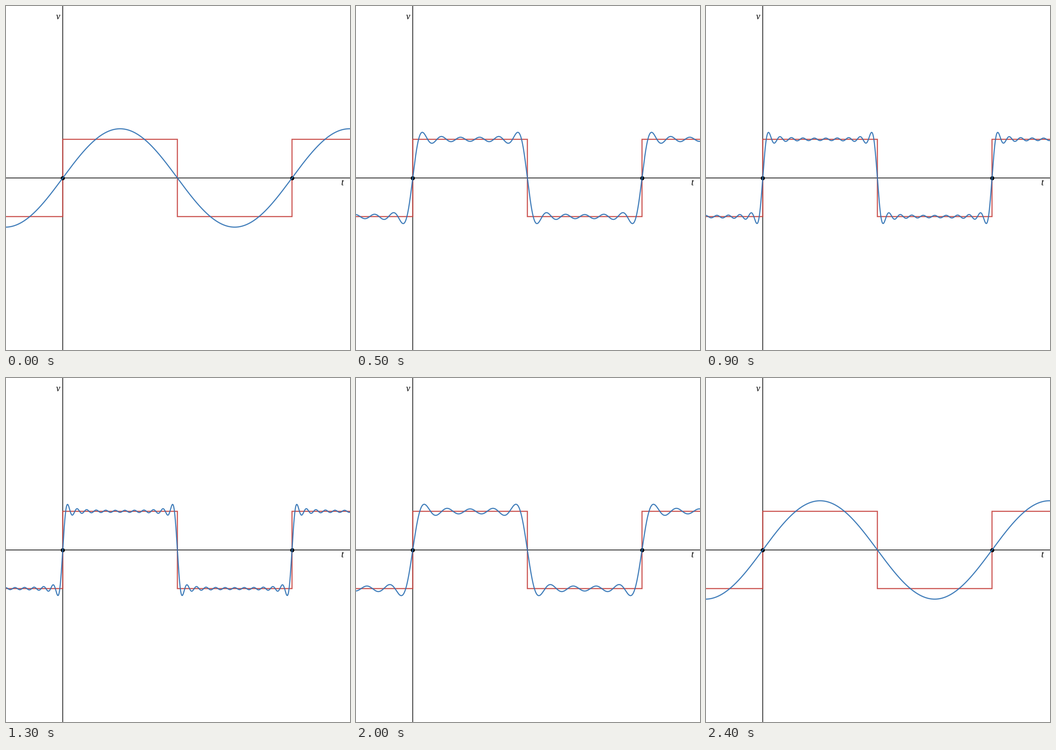
These frames come from a looping animation (748x748 px, 2.5 s). A matplotlib script:

```python
import numpy as np
import matplotlib.pyplot as plt
from matplotlib.animation import FuncAnimation

SIZE = 748
DPI = 68
PX = 72 / DPI                 # points per pixel
X0, Y0 = 123.4, 373.9         # origin of the axes
PERIOD, AMP = 498.5, 84
MAX_TERMS = 13
FRAMES = 2 * MAX_TERMS - 1
RED, BLUE = "#c74440", "#2d70b3"

fig = plt.figure(figsize=(SIZE / DPI, SIZE / DPI), dpi=DPI, facecolor="white")
ax = fig.add_axes([0, 0, 1, 1])
ax.set_xlim(0, SIZE)
ax.set_ylim(SIZE, 0)
ax.axis("off")


def stroke(x, y, color, width, z, **kw):
    line, = ax.plot(x, y, color=color, lw=width * PX, zorder=z, snap=False, **kw)
    return line


def label(x, y, text):
    ax.text(x, y, text, family="Liberation Serif", style="italic",
            size=20 * PX, ha="center", va="baseline", color="black")


def fourier(x, terms):
    """Partial sum of the square wave's odd harmonics, in pixels."""
    phase = 2 * np.pi * (x - X0) / PERIOD
    odd = 2 * np.arange(terms)[:, None] + 1
    return Y0 - AMP * 4 / np.pi * (np.sin(odd * phase) / odd).sum(axis=0)


# Axes
stroke([-5, SIZE + 5], [Y0, Y0], "black", 1.5, 1)
stroke([X0, X0], [-5, SIZE + 5], "black", 1.5, 1)
label(113.3, 29, "v")
label(730.5, 389.5, "t")

# Square wave
edges = X0 + PERIOD / 2 * np.arange(-1, 4)
levels = Y0 + AMP * np.array([1, -1, 1, -1])
stroke(np.repeat(edges, 2)[1:-1], np.repeat(levels, 2), RED, 2.4, 2,
       alpha=0.9, solid_joinstyle="miter")

# Period marks
ax.plot([X0, X0 + PERIOD], [Y0, Y0], "o", color="black", ms=9 * PX, mew=0,
        zorder=3, snap=False)

xs = np.linspace(-4, SIZE + 4, 3025)
wave = stroke(xs, fourier(xs, 1), BLUE, 2.4, 4, alpha=0.9)


def update(i):
    terms = MAX_TERMS - abs(i - (MAX_TERMS - 1))
    wave.set_ydata(fourier(xs, terms))
    return wave,


anim = FuncAnimation(fig, update, frames=FRAMES, interval=100,
                     repeat=True, repeat_delay=0, blit=False)
plt.show()
```
